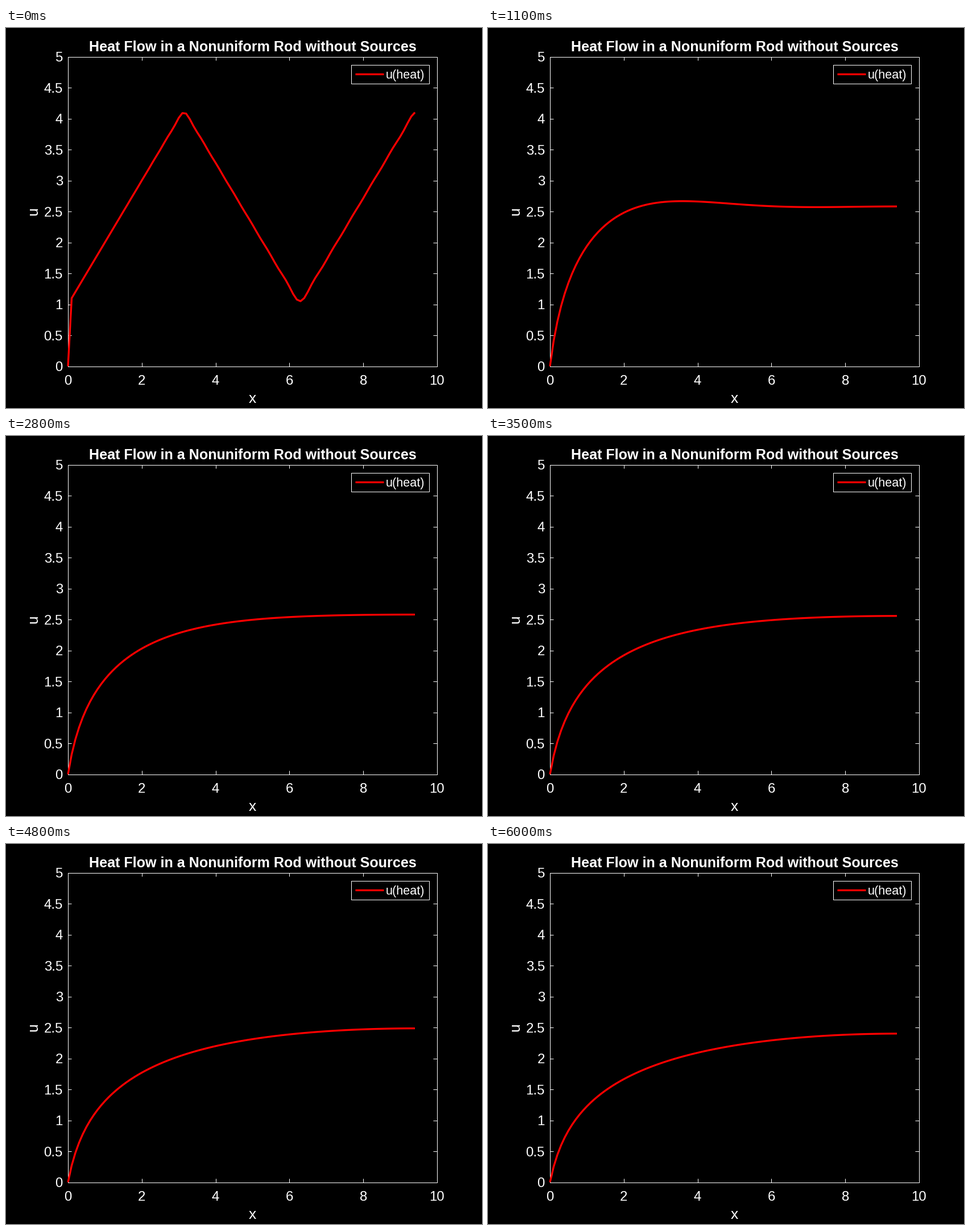
Write a matplotlib script that moves like this. It is 837 by 669 pixels and loops after 6.1 s.

```python
import numpy as np
import matplotlib.pyplot as plt
from matplotlib.animation import FuncAnimation
from matplotlib.patches import Rectangle

W, H, DPI = 837, 669, 64  # a power of two keeps the pixel size exact
LEFT, RIGHT, TOP, BOTTOM = 109, 758, 50.5, 595.5
FRAMES, INTERVAL = 61, 100
DX, MODES = 0.1, 50

plt.rcParams["font.family"] = "Liberation Sans"


def px(size):
    """Pixels to points."""
    return size * 72 / DPI


def to_x(x):
    return LEFT + x * (RIGHT - LEFT) / 10


def to_y(u):
    return BOTTOM - u * (BOTTOM - TOP) / 5


# Rod: u_t = (K u_x)_x, held at zero on the left, insulated on the right
x = np.arange(95) * DX


def conductivity(s):
    return 0.235 + 0.91 * s - 0.05 * s ** 2


def start_profile(s):
    return 1 + np.pi - np.abs(np.pi - s % (2 * np.pi))


def solve_modes():
    k = conductivity(x[:-1] + DX / 2)
    k_next = np.append(k[1:], 0)
    a = np.diag(k + k_next) - np.diag(k[1:], 1) - np.diag(k[1:], -1)
    rates, shapes = np.linalg.eigh(a / DX ** 2)
    rates, shapes = rates[:MODES], shapes[:, :MODES]
    return rates, shapes, shapes.T @ start_profile(x[1:])


rates, shapes, weights = solve_modes()


def temperature(t):
    return np.append(0, shapes @ (weights * np.exp(-rates * t)))


fig = plt.figure(figsize=(W / DPI, H / DPI), dpi=DPI, facecolor="black")
ax = fig.add_axes([0, 0, 1, 1])
ax.set_xlim(0, W)
ax.set_ylim(H, 0)
ax.axis("off")


def segment(xs, ys, color="white", width=1.0, **kw):
    return ax.plot(xs, ys, color=color, lw=px(width), solid_capstyle="butt", **kw)[0]


def label(tx, ty, text, size, ha="center", **kw):
    ax.text(tx, ty, text, color="white", fontsize=px(size), ha=ha,
            va=kw.pop("va", "baseline"), **kw)


def box(x0, y0, x1, y1):
    ax.add_patch(Rectangle((x0, y0), x1 - x0, y1 - y0, facecolor="black",
                           edgecolor="white", lw=px(1)))


box(LEFT, TOP, RIGHT, BOTTOM)
TICK = 6.5
for v in range(0, 11, 2):
    tx = to_x(v)
    segment([tx, tx], [BOTTOM, BOTTOM - TICK])
    segment([tx, tx], [TOP, TOP + TICK])
    label(tx, 628, str(v), 24)
for v in np.arange(0, 5.1, 0.5):
    ty = to_y(v)
    segment([LEFT, LEFT + TICK], [ty, ty])
    segment([RIGHT - TICK, RIGHT], [ty, ty])
    label(100, ty + 8.7, f"{v:g}", 24, ha="right")

label(433.5, 41, "Heat Flow in a Nonuniform Rod without Sources", 25.15, weight="bold")
label(433.5, 659.5, "x", 26.4)
label(48, 323, "u", 26.4, va="center", rotation=90)

curve = segment([], [], "red", 3.3, solid_joinstyle="round", zorder=4)

box(607.5, 64.5, 744.5, 97.5)
segment([614, 664], [81, 81], "red", 3.3)
label(667.6, 88.7, "u(heat)", 21.6, ha="left")


def update(i):
    curve.set_data(to_x(x), to_y(temperature(i * INTERVAL / 1000)))
    return (curve,)


anim = FuncAnimation(fig, update, frames=FRAMES, interval=INTERVAL,
                     repeat=True, repeat_delay=0)
plt.show()
```
